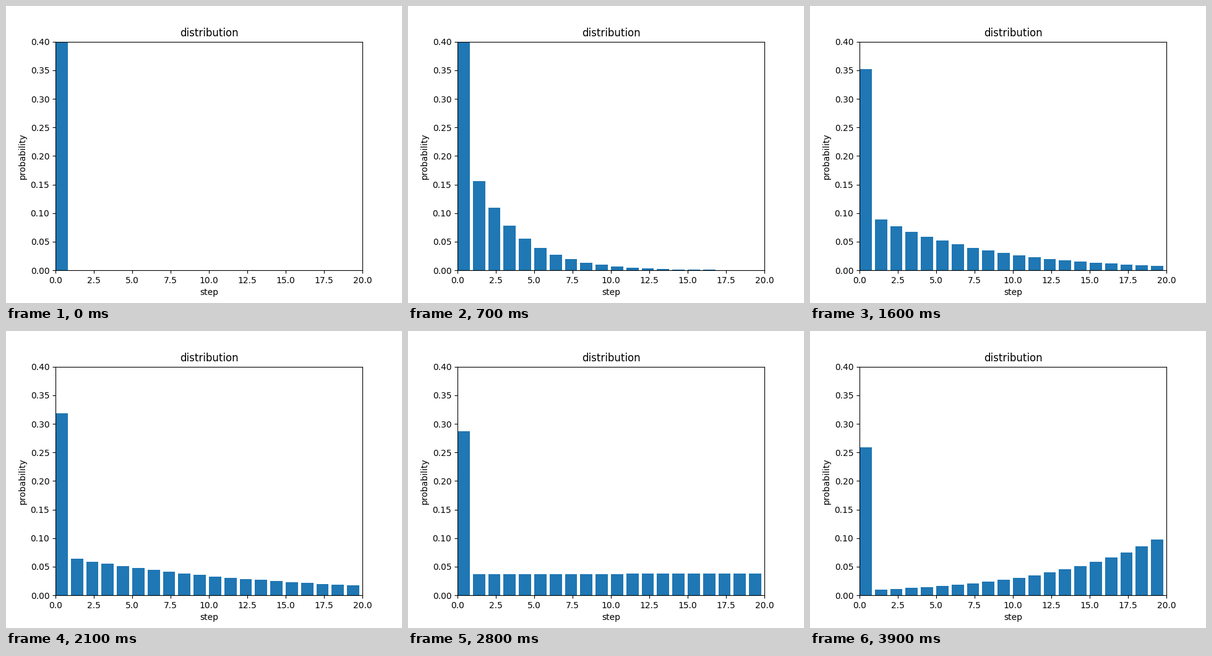
A matplotlib script that plays this animation: 640x480 px, repeating every 4000 ms.

```python
import numpy as np
import matplotlib.pyplot as plt
from matplotlib.animation import FuncAnimation

FRAMES = 40
INTERVAL = 100
STATES = np.arange(20)
IDLE = 0.25  # share that always rests at step 0
MEANS = np.linspace(0, 10, FRAMES)


def geometric(slope):
    weights = np.exp(slope * STATES - max(0, slope * STATES[-1]))
    return weights / weights.sum()


def distribution(mean):
    """Truncated geometric law plus the idle share, with the given mean."""
    low, high = -50.0, 5.0
    for _ in range(60):
        mid = (low + high) / 2
        if (1 - IDLE) * (geometric(mid) @ STATES) < mean:
            low = mid
        else:
            high = mid
    probs = (1 - IDLE) * geometric(low)
    probs[0] += IDLE
    return probs


fig, ax = plt.subplots(figsize=(6.4, 4.8), dpi=100)
bars = ax.bar(STATES, distribution(MEANS[0]), width=0.8, align="edge",
              color="#1f77b4")
ax.set_xlim(0, 20)
ax.set_ylim(0, 0.4)
ax.set_title("distribution")
ax.set_xlabel("step")
ax.set_ylabel("probability")


def update(frame):
    for bar, height in zip(bars, distribution(MEANS[frame])):
        bar.set_height(height)
    return list(bars)


anim = FuncAnimation(fig, update, frames=FRAMES, interval=INTERVAL,
                     repeat=True, repeat_delay=0)
plt.show()
```
